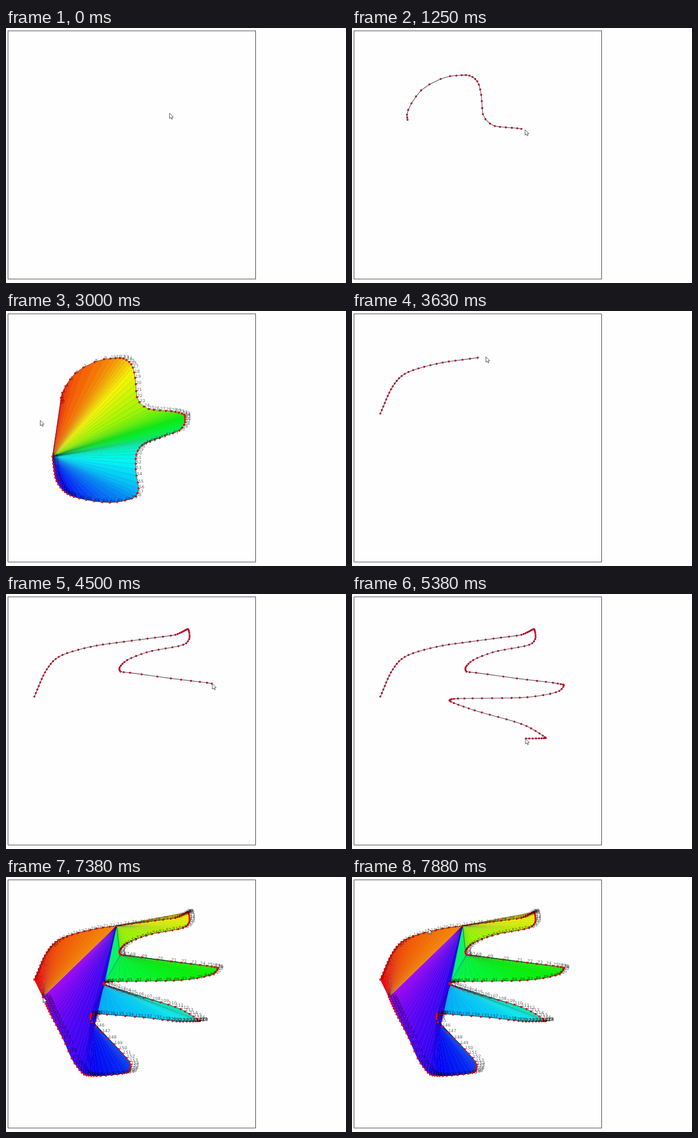
An HTML page with a canvas that plays this animation: 600 by 450 pixels, repeating every 8000 ms.

```html
<!DOCTYPE html>
<html lang="en">
<head>
<meta charset="utf-8">
<title>Polygon triangulation</title>
<style>
  html, body { margin: 0; width: 100%; height: 100%; overflow: hidden; background: #fefefe; }
  canvas { display: block; }
</style>
</head>
<body>
<canvas id="stage" width="600" height="450"></canvas>
<script>
const ctx = document.getElementById('stage').getContext('2d');
const LOOP = 8000, TICK = 125;

// Key points of each outline: point index, x, y
const head = trace([
  [0, 98, 162], [2, 97, 153], [6, 122, 110], [9, 173, 85], [12, 201, 83], [16, 221, 94],
  [19, 228, 118], [22, 231, 152], [25, 252, 173], [30, 299, 178], [34, 316, 185], [37, 316, 196],
  [40, 306, 211], [42, 281, 220], [48, 236, 241], [51, 229, 261], [53, 229, 279], [56, 234, 313],
  [58, 229, 327], [62, 183, 338], [67, 120, 328], [71, 100, 316], [75, 87, 294], [81, 82, 257]
]);
const hand = trace([
  [0, 50, 181], [8, 72, 133], [13, 93, 111], [20, 160, 91], [23, 195, 86], [28, 263, 77],
  [31, 299, 72], [40, 321, 62], [45, 324, 76], [48, 318, 87], [55, 248, 103], [60, 209, 120],
  [64, 200, 132], [66, 202, 137], [68, 219, 139], [71, 291, 149], [76, 363, 158], [79, 374, 161],
  [82, 366, 171], [88, 296, 183], [96, 180, 185], [99, 172, 188], [104, 206, 202], [112, 308, 233],
  [118, 342, 254], [126, 307, 255], [130, 276, 252], [132, 243, 248], [139, 152, 241],
  [144, 149, 251], [150, 199, 304], [154, 220, 331], [158, 216, 344], [165, 160, 351],
  [169, 142, 350], [174, 121, 329], [178, 100, 284], [185, 76, 237], [191, 65, 212]
]);

// Monotone cubic through the keys, sampled at every index
function trace(keys) {
  const last = keys.length - 1;
  const slope = (k, c) => (keys[k + 1][c] - keys[k][c]) / (keys[k + 1][0] - keys[k][0]);
  const tangent = (k, c) => {
    if (k === 0) return slope(0, c);
    if (k === last) return slope(k - 1, c);
    const a = slope(k - 1, c), b = slope(k, c);
    return a * b > 0 ? 2 * a * b / (a + b) : 0;
  };
  const pts = [keys[0].slice(1)];
  for (let k = 0; k < last; k++) {
    const p = keys[k], q = keys[k + 1], n = q[0] - p[0];
    for (let j = 1; j <= n; j++) {
      const s = j / n, r = 1 - s;
      pts.push([1, 2].map(c =>
        p[c] * r * r * (1 + 2 * s) + q[c] * s * s * (3 - 2 * s) +
        n * s * r * (tangent(k, c) * r - tangent(k + 1, c) * s)));
    }
  }
  return pts;
}

// One fan per lobe between the corners, each lobe then joined to the first corner
function triangulate(pts, corners) {
  const tris = [], end = pts.length - 1;
  const fan = (apex, from, to) => {
    for (let i = from; i < to; i++) tris.push([apex, i, i + 1]);
  };
  const hub = corners[0] ?? end - 1;
  fan(end, 0, hub);
  corners.forEach((a, n) => {
    const b = corners[n + 1];
    if (b === undefined) return fan(hub, a, end);
    fan(a, a + 1, b);
    if (a !== hub) tris.push([hub, a, b]);
  });
  return tris;
}

const headTris = triangulate(head, []);
const handTris = triangulate(hand, [23, 66, 100, 144, 170]);

// Pen position along the outline at tick k
function headPace(k) {
  const s = Math.max(0, Math.min(1, (k - 6.3) / 12.7));
  return 81 * (1 - (1 - s) ** 1.4);
}
function handPace(k) {
  const u = 25.99 + 7.16 * (k - 29), late = Math.max(0, u - 163);
  return Math.min(191, u - 0.42 * late);
}

const mix = (a, b, s) => [0, 1].map(c => a[c] + (b[c] - a[c]) * s);

function along(pts, u) {
  const i = Math.floor(u);
  return mix(pts[i], pts[Math.min(i + 1, pts.length - 1)], u - i);
}

function poly(pts) {
  ctx.beginPath();
  pts.forEach(p => ctx.lineTo(p[0], p[1]));
}

function strokeLine(pts, color, width) {
  poly(pts);
  ctx.strokeStyle = color;
  ctx.lineWidth = width;
  ctx.stroke();
}

function dots(pts, r, color) {
  ctx.fillStyle = color;
  for (const [x, y] of pts) {
    ctx.beginPath();
    ctx.arc(x, y, r, 0, 7);
    ctx.fill();
  }
}

function drawStroke(pts, u) {
  const part = pts.slice(0, Math.floor(u) + 1);
  strokeLine(part, '#707070', 1.3);
  dots(part, 1.8, '#b80424');
}

function drawMesh(pts, tris) {
  ctx.lineJoin = 'round';
  tris.forEach((tri, n) => {
    const corners = tri.map(i => pts[i]);
    const color = `hsl(${280 * n / tris.length} 97% 49%)`;
    strokeLine(corners, color, 0.4);
    ctx.fillStyle = color;
    ctx.fill();
  });
  for (const [a, b] of tris) strokeLine([pts[a], pts[b]], 'rgba(0,0,90,.24)', 0.6);
  strokeLine(pts, 'rgba(40,40,40,.6)', 1);
  dots(pts, 1.9, '#e00c0c');
  ctx.fillStyle = 'rgba(0,0,0,.6)';
  ctx.font = '7.5px "DejaVu Sans", sans-serif';
  pts.forEach(([x, y], i) => ctx.fillText(i, x + 0.5, y));
}

function drawPointer([x, y]) {
  ctx.save();
  ctx.translate(x + 0.5, y + 0.3);
  poly([[0, 0], [0, 9.5], [2.2, 7.5], [3.8, 10.8], [5.3, 10.1], [3.8, 7], [6.8, 6.8]]);
  ctx.closePath();
  ctx.fillStyle = '#fff';
  ctx.strokeStyle = '#333';
  ctx.lineWidth = 0.8;
  ctx.fill();
  ctx.stroke();
  ctx.restore();
}

function draw(k) {
  ctx.fillStyle = '#fefefe';
  ctx.fillRect(0, 0, 600, 450);
  ctx.strokeStyle = '#484848';
  ctx.lineWidth = 1;
  ctx.strokeRect(3.5, 5, 437, 438);

  let pointer;
  const sketch = (pts, u) => {
    drawStroke(pts, u);
    pointer = along(pts, u);
  };
  if (k < 5) {
    const s = k / 5;
    pointer = mix([288, 150], head[0], s);
    pointer[1] += 13 * s * Math.sin(Math.PI * s);
  } else if (k < 21) {
    sketch(head, headPace(k));
  } else if (k < 26) {
    drawMesh(head, headTris);
    pointer = mix(head[81], hand[0], 1 - ((26 - k) / 6) ** 1.7);
    pointer[0] += 5;
  } else if (k < 58) {
    sketch(hand, handPace(k));
  } else {
    drawMesh(hand, handTris);
    pointer = mix(hand[191], [134, 91], Math.max(0, k - 61) / 2);
  }
  drawPointer(pointer);
}

const start = performance.now();
let shown = -1;
function frame(now) {
  const t = Math.max(0, now - start) % LOOP;
  const k = Math.min(63, Math.floor((t + 1) / TICK));
  if (k !== shown) draw(shown = k);
  requestAnimationFrame(frame);
}
frame(start);
</script>
</body>
</html>
```
